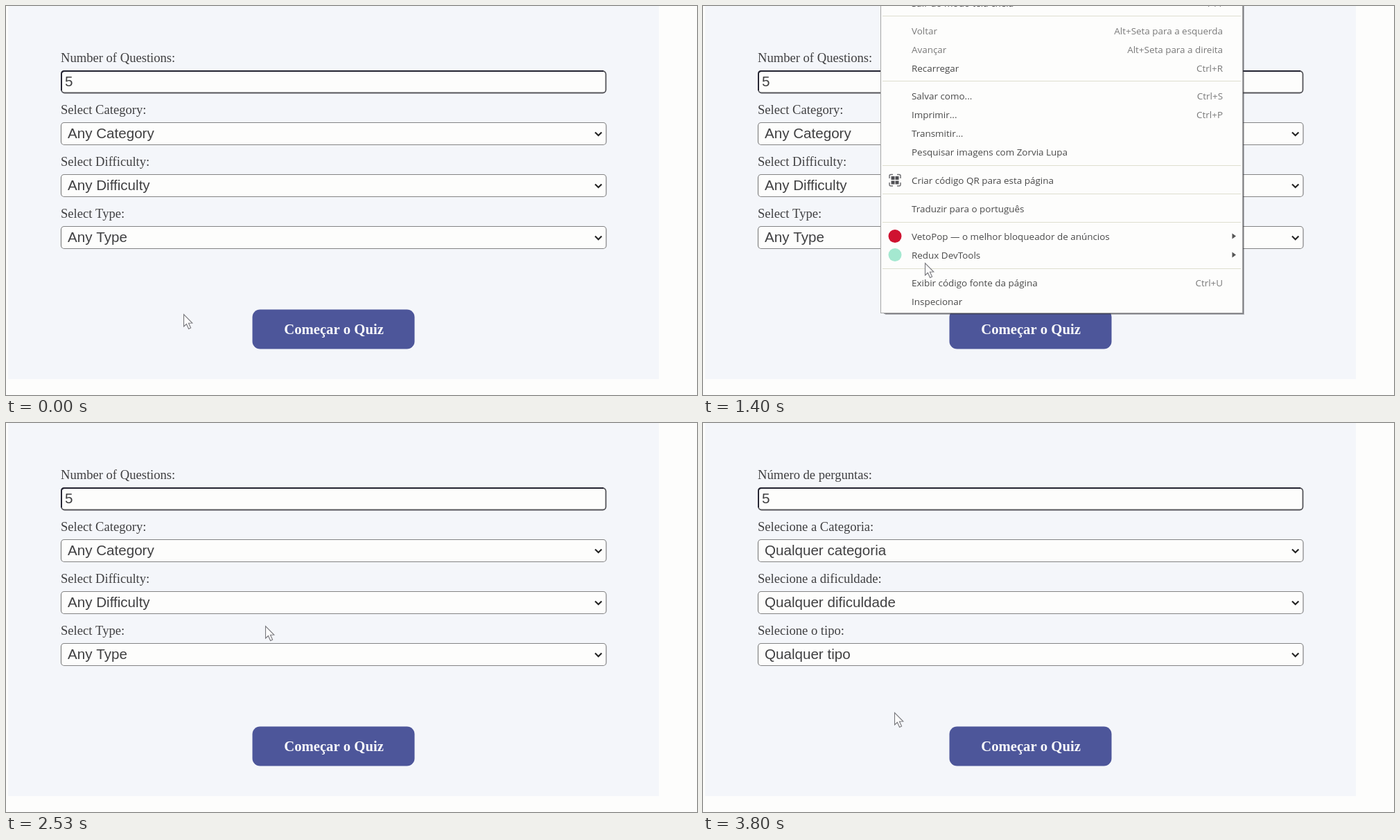
Animation of 997x562 px, one loop 4740 ms. Source, as an HTML page with a canvas:

```html
<!DOCTYPE html>
<html lang="pt">
<head>
<meta charset="utf-8">
<title>Quiz</title>
<style>
html, body { margin: 0; width: 100%; height: 100%; overflow: hidden; background: #fdfdfc; }
canvas { display: block; }
</style>
</head>
<body>
<canvas id="stage" width="997" height="562"></canvas>
<script>
const ctx = document.getElementById('stage').getContext('2d');
const LOOP = 4740;
const MENU_OPEN = 870, MENU_CLOSE = 2520, TRANSLATED = 3200;
const SERIF = '"Liberation Serif", serif';
const SANS = '"Liberation Sans", Arial, sans-serif';
const MENU_FONT = '13.45px "Open Sans", sans-serif';
const PAPER = '#fdfdfc';

const FORM = {
  en: {
    labels: ['Number of Questions:', 'Select Category:', 'Select Difficulty:', 'Select Type:'],
    values: ['5', 'Any Category', 'Any Difficulty', 'Any Type']
  },
  pt: {
    labels: ['Número de perguntas:', 'Selecione a Categoria:', 'Selecione a dificuldade:', 'Selecione o tipo:'],
    values: ['5', 'Qualquer categoria', 'Qualquer dificuldade', 'Qualquer tipo']
  }
};

const MENU = [
  { y: -4, text: 'Sair do modo tela cheia', key: 'F11' },
  { y: 36, text: 'Voltar', key: 'Alt+Seta para a esquerda', dim: true },
  { y: 63, text: 'Avançar', key: 'Alt+Seta para a direita', dim: true },
  { y: 90, text: 'Recarregar', key: 'Ctrl+R' },
  { y: 130, text: 'Salvar como...', key: 'Ctrl+S' },
  { y: 157, text: 'Imprimir...', key: 'Ctrl+P' },
  { y: 184, text: 'Transmitir...' },
  { y: 211, text: 'Pesquisar imagens com Zorvia Lupa' },
  { y: 252, text: 'Criar código QR para esta página' },
  { y: 293, text: 'Traduzir para o português' },
  { y: 333, text: 'VetoPop — o melhor bloqueador de anúncios', dot: '#cf1230', submenu: true },
  { y: 360, text: 'Redux DevTools', dot: '#a4e8d0', submenu: true },
  { y: 400, text: 'Exibir código fonte da página', key: 'Ctrl+U' },
  { y: 427, text: 'Inspecionar' }
];
const SEPARATORS = [14, 108, 230, 271, 312, 379];

// Pointer strokes: start and end time, start, bend and end point.
const MOVES = [
  { t0: 1080, t1: 1720, from: [256, 445], bend: [325, 373], to: [374, 293] },
  { t0: 2700, t1: 2860, from: [374, 293], bend: [373, 297], to: [370, 299] },
  { t0: 3120, t1: 3680, from: [370, 299], bend: [328, 365], to: [276, 418] }
];

function pointerAt(t) {
  let move = MOVES[0];
  for (const m of MOVES) if (t >= m.t0) move = m;
  const u = Math.min(1, Math.max(0, (t - move.t0) / (move.t1 - move.t0)));
  const s = u * u * (3 - 2 * u), r = 1 - s;
  return [0, 1].map(i => r * r * move.from[i] + 2 * r * s * move.bend[i] + s * s * move.to[i]);
}

function rect(x, y, w, h, color) {
  ctx.fillStyle = color;
  ctx.fillRect(x, y, w, h);
}

function roundBox(x, y, w, h, radius, fill, stroke, lineWidth = 1) {
  ctx.beginPath();
  ctx.roundRect(x, y, w, h, radius);
  ctx.fillStyle = fill;
  ctx.fill();
  if (!stroke) return;
  ctx.strokeStyle = stroke;
  ctx.lineWidth = lineWidth;
  ctx.stroke();
}

function text(str, x, y, font, color, align = 'left') {
  ctx.font = font;
  ctx.fillStyle = color;
  ctx.textAlign = align;
  ctx.fillText(str, x, y);
}

function polygon(points, fill, stroke) {
  ctx.beginPath();
  points.forEach(([x, y]) => ctx.lineTo(x, y));
  ctx.closePath();
  ctx.fillStyle = fill;
  ctx.fill();
  if (!stroke) return;
  ctx.strokeStyle = stroke;
  ctx.lineWidth = 1.1;
  ctx.stroke();
}

function drawChevron(y) {
  ctx.beginPath();
  ctx.moveTo(850, y - 2);
  ctx.lineTo(854.7, y + 2.6);
  ctx.lineTo(859.4, y - 2);
  ctx.strokeStyle = '#222';
  ctx.lineWidth = 2.1;
  ctx.stroke();
}

function drawForm({ labels, values }) {
  rect(0, 0, 997, 562, PAPER);
  rect(3, 0, 939, 539, '#f4f6fa');
  labels.forEach((label, i) => {
    const y = 109.3 + i * 75.1;
    text(label, 79, y - 28.5, '18.6px ' + SERIF, '#404042');
    if (i === 0) {
      roundBox(80, 94, 785.5, 31.5, 4.5, PAPER, '#55555a', 1.8);
      ctx.beginPath();
      ctx.moveTo(80, 122);
      ctx.lineTo(80, 98);
      ctx.quadraticCurveTo(80, 94, 84, 94);
      ctx.lineTo(862, 94);
      ctx.strokeStyle = '#222230';
      ctx.stroke();
    } else {
      roundBox(79.5, Math.floor(y - 16) + 0.5, 786.5, 32, 4.5, PAPER, '#838384', 1.2);
      drawChevron(y);
    }
    text(values[i], i ? 89 : 85, y + 6.7, '20.6px ' + SANS, '#404042');
  });
  roundBox(355.5, 438.5, 234, 57, 11, '#4d569a');
  text('Começar o Quiz', 473, 474, 'bold 20.7px ' + SERIF, '#fafafc', 'center');
}

function drawGridIcon() {
  roundBox(269, 243.5, 16, 16.5, 2, PAPER, '#707073', 1.5);
  rect(274, 242, 6, 20, PAPER);
  rect(267, 249, 20, 6, PAPER);
  for (const x of [271.5, 277.5]) for (const y of [246, 252.5]) rect(x, y, 5, 5, '#505054');
}

function drawMenu(hoverY) {
  // Soft shadow below and to the right.
  rect(263, 0, 518, 446, 'rgba(60, 60, 66, 0.35)');
  rect(261, 0, 519, 445, 'rgba(60, 60, 66, 0.5)');
  rect(256, 0, 523, 444, '#a6a6a6');
  rect(257, 0, 521, 443, PAPER);
  SEPARATORS.forEach(y => rect(259, y, 517, 1, '#dedecf'));

  for (const item of MENU) {
    const { y } = item;
    if (Math.abs(hoverY - y) < 13.5) rect(257, y - 14, 521, 27, '#e1e1e1');
    text(item.text, 301, y + 5, MENU_FONT, item.dim ? '#7a7a7a' : '#4a4a4a');
    if (item.key) text(item.key, 750, y + 5, MENU_FONT, '#7a7a7a', 'right');
    if (item.dot) {
      ctx.beginPath();
      ctx.arc(277, y - 0.5, 9.5, 0, Math.PI * 2);
      ctx.fillStyle = item.dot;
      ctx.fill();
    }
    if (item.submenu) polygon([[763.5, y - 4.5], [769, y - 0.5], [763.5, y + 3.5]], '#555');
  }
  drawGridIcon();
}

function drawPointer([x, y]) {
  const shape = [[0.5, 0.5], [0.5, 18], [4.4, 14.5], [7.6, 21.5], [10.6, 20.1], [7.4, 13.3], [12.8, 13]];
  polygon(shape.map(([dx, dy]) => [x + dx, y + dy]), '#fcfcfc', '#77777c');
}

function render(now) {
  const t = now % LOOP;
  drawForm(t < TRANSLATED ? FORM.en : FORM.pt);
  // The highlight trails the pointer slightly.
  if (t >= MENU_OPEN && t < MENU_CLOSE) drawMenu(pointerAt(t - 25)[1]);
  drawPointer(pointerAt(t));
}

let start;
function frame(now) {
  start ??= now;
  render(now - start);
  requestAnimationFrame(frame);
}
render(0);
requestAnimationFrame(frame);
</script>
</body>
</html>
```
